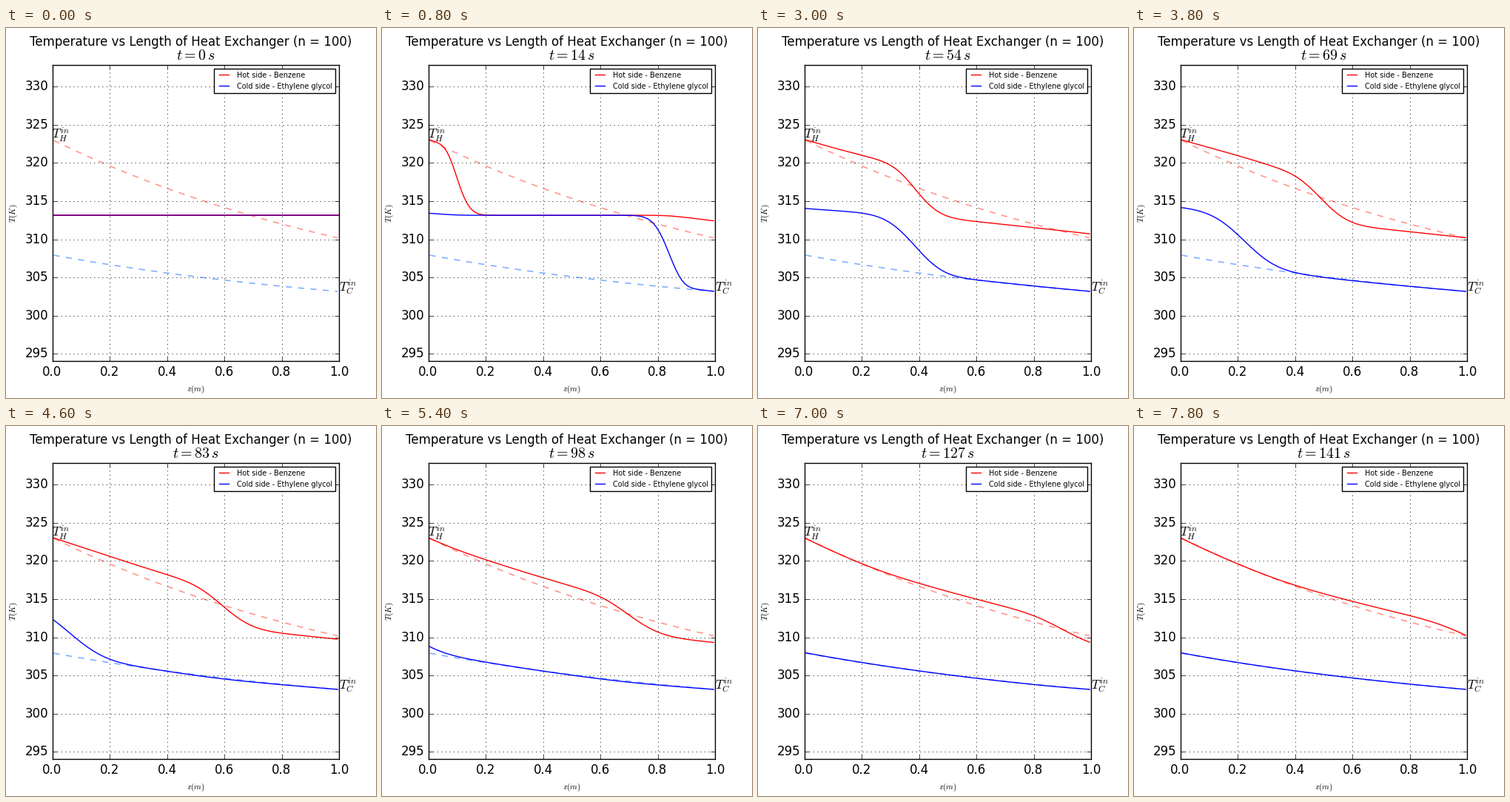
These frames come from a looping animation (500x500 px, 8000 ms). A matplotlib script:

```python
import numpy as np
import matplotlib.pyplot as plt
from matplotlib.animation import FuncAnimation

plt.style.use("classic")
plt.rcParams["font.sans-serif"] = ["DejaVu Sans"]

FRAMES, INTERVAL = 40, 200
N = 100                        # cells along the exchanger
DT = 360 / 99                  # simulated seconds per frame
T_HOT, T_COLD, T_START = 323.15, 303.15, 313.15
V_HOT, V_COLD = 0.00724, 0.01136        # flow speeds, lengths per second
K_HOT, K_COLD = 0.00891, 0.00515        # heat transfer rates, 1/s


def build_system():
    """Counter-flow exchanger, upwind cells: dT/dt = m @ T + c."""
    eye = np.eye(N)
    hot = V_HOT * N * (np.eye(N, k=-1) - eye) - K_HOT * eye
    cold = V_COLD * N * (np.eye(N, k=1) - eye) - K_COLD * eye
    m = np.block([[hot, K_HOT * eye], [K_COLD * eye, cold]])
    c = np.zeros(2 * N)
    c[0] = V_HOT * N * T_HOT
    c[-1] = V_COLD * N * T_COLD
    return m, c


def propagator(m, dt, parts=16):
    """Matrix exponential of m * dt from short fourth-order steps."""
    eye = np.eye(len(m))
    a = m * dt / parts
    p = eye
    for k in (4, 3, 2, 1):
        p = eye + a @ p / k
    return np.linalg.matrix_power(p, parts)


m, c = build_system()
steady = np.linalg.solve(m, -c)
step = propagator(m, DT)
states = [np.full(2 * N, T_START)]
for _ in range(FRAMES - 1):
    states.append(steady + step @ (states[-1] - steady))

z = (np.arange(N) + 0.5) / N

fig = plt.figure(figsize=(5, 5), dpi=100, facecolor="white")
ax = fig.add_axes([0.125, 0.1, 0.775, 0.8])
ax.set_xlim(0, 1)
ax.set_ylim(0.97 * T_COLD, 1.03 * T_HOT)
ax.set_yticks(range(295, 331, 5))
ax.grid(True)

fig.suptitle("Temperature vs Length of Heat Exchanger (n = 100)", fontsize=12)
title = ax.set_title("$t = 0\\,s$")
ax.set_xlabel("$z(m)$", fontsize=8)
ax.set_ylabel("$T(K)$", fontsize=8)
ax.text(0, T_HOT, "$T_H^{in}$", fontsize=12)
ax.text(1, T_COLD, "$T_C^{in}$", fontsize=12)

ax.plot(z, steady[:N], "--", color="#ff9790", lw=1.2)
ax.plot(z, steady[N:], "--", color="#7fb0ff", lw=1.2)
hot_line, = ax.plot(z, states[0][:N], "r", label="Hot side - Benzene")
cold_line, = ax.plot(z, states[0][N:], "b", label="Cold side - Ethylene glycol")
start_line, = ax.plot([0, 1], [T_START, T_START], color="purple", lw=1.4)
ax.legend(handles=[hot_line, cold_line], loc="upper right", fontsize=7)


def draw(i):
    hot_line.set_ydata(states[i][:N])
    cold_line.set_ydata(states[i][N:])
    hot_line.set_visible(i > 0)
    cold_line.set_visible(i > 0)
    start_line.set_visible(i == 0)
    title.set_text("$t = %d\\,s$" % int(i * DT + 1e-6))
    return hot_line, cold_line, start_line, title


anim = FuncAnimation(fig, draw, frames=FRAMES, interval=INTERVAL,
                     repeat=True, repeat_delay=0, blit=False)
plt.show()
```
